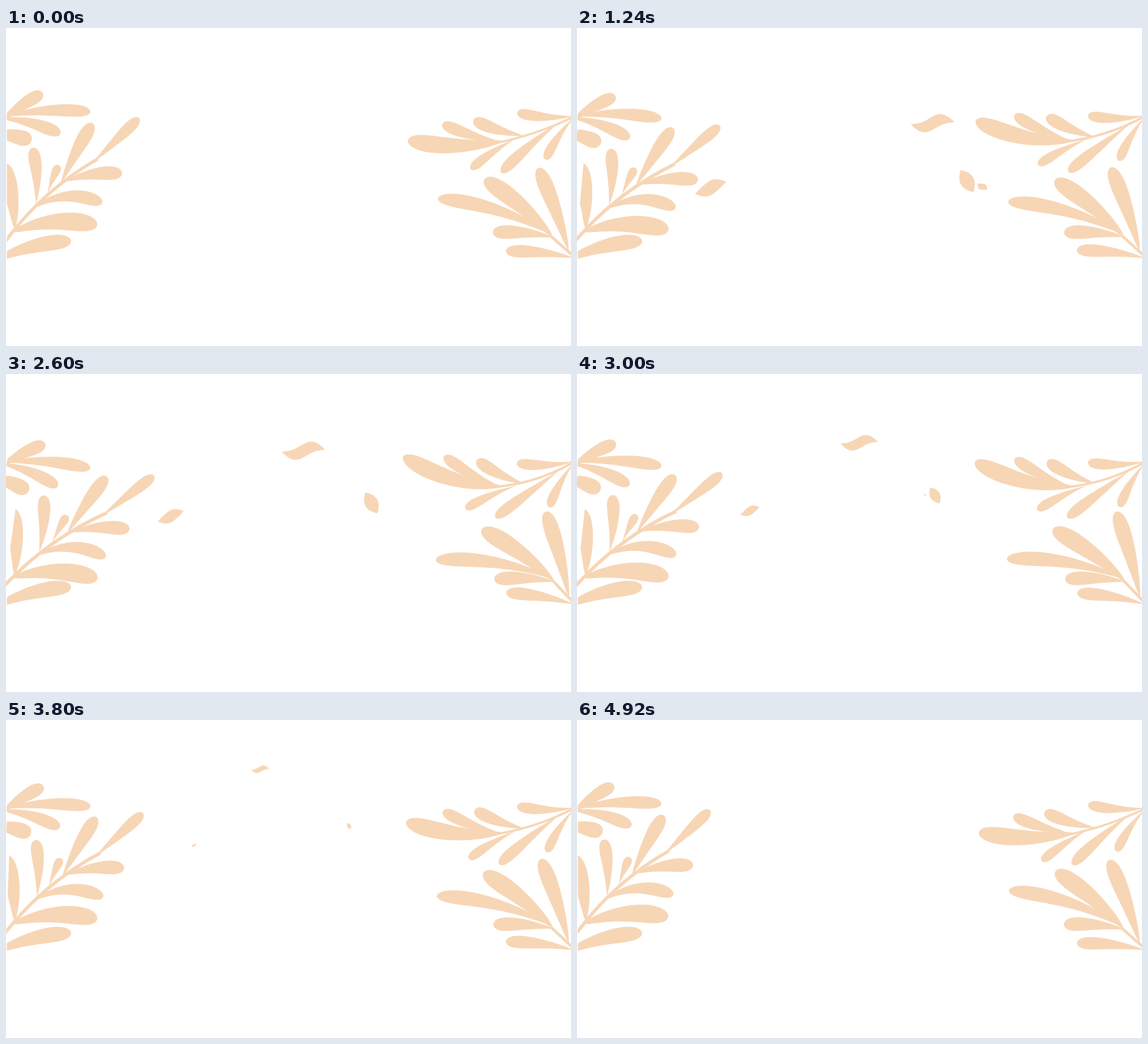
An HTML page with a canvas for the animation above (5040 ms loop, 998 by 561 pixels).

```html
<!DOCTYPE html>
<html lang="en">
<head>
<meta charset="utf-8">
<title>Swaying leaves</title>
<style>
html, body { margin: 0; width: 100%; height: 100%; overflow: hidden; background: #fff; }
canvas { display: block; }
</style>
</head>
<body>
<canvas id="stage" width="998" height="561"></canvas>
<script>
const ctx = document.getElementById('stage').getContext('2d');
const WIDTH = 998, HEIGHT = 561, LOOP = 5040, STEP = 40, COLOR = '#f7d6b6', CUT = 1.5;

const clamp = v => Math.max(0, Math.min(1, v));

// 0 -> 1 -> 0 with sine easing on both halves.
const sway = (start, peak, end) => t => {
  const k = t < peak ? (t - start) / (peak - start) : (end - t) / (end - peak);
  return (1 - Math.cos(Math.PI * clamp(k))) / 2;
};

function rotate([x, y], [cx, cy], angle) {
  const c = Math.cos(angle), n = Math.sin(angle);
  return [cx + (x - cx) * c - (y - cy) * n, cy + (x - cx) * n + (y - cy) * c];
}

// Bends move a point; s is the amount of sway.
const still = p => p;
const turn = (cx, cy, angle) => (p, s) => rotate(p, [cx, cy], angle * s);
const lean = ([x, y], s) => [x + 0.147 * (352 - y) * s, y + 0.098 * (x - 12) * s];

// Turns around the middle of the branch, fades to the fixed root, curls at the far end.
function curl([x, y], s) {
  const d = x - 885;
  const angle = 0.19 * s * (1 - Math.max(0, d) / 113);
  const far = s * Math.max(0, 820 - x) ** 2;
  return [x - angle * (y - 195) - 0.0007 * far, y + angle * d - 0.002 * far];
}

// Start, control and end of a curve whose middle lies "bow" to the left of its chord.
function bowed(x0, y0, x1, y1, bow) {
  const dx = x1 - x0, dy = y1 - y0, k = 2 * bow / Math.hypot(dx, dy);
  return [[x0, y0], [(x0 + x1) / 2 + dy * k, (y0 + y1) / 2 - dx * k], [x1, y1]];
}

function fill(points) {
  ctx.beginPath();
  for (const [x, y] of points) ctx.lineTo(x, y);
  ctx.fill();
}

// Club shape along a curve: narrow leaves swell later than wide ones, all end round.
function drawLeaf([a, b, c], width) {
  const rise = 20 / width, n = 6, samples = 32;
  const profile = u => u ** rise * Math.sqrt(1 - u ** n);
  const half = width / 2 / profile((2 * rise / (2 * rise + n)) ** (1 / n));
  const left = [], right = [];
  for (let i = 0; i <= samples; i++) {
    const u = 1 - (1 - i / samples) ** 2, v = 1 - u;
    const [x, y] = [0, 1].map(j => v * v * a[j] + 2 * u * v * b[j] + u * u * c[j]);
    const [dx, dy] = [0, 1].map(j => v * (b[j] - a[j]) + u * (c[j] - b[j]));
    const k = half * profile(u) / Math.hypot(dx, dy);
    left.push([x + dy * k, y - dx * k]);
    right.unshift([x - dy * k, y + dx * k]);
  }
  fill([...left, ...right]);
}

function drawStem([a, b, c], width) {
  ctx.lineWidth = width;
  ctx.beginPath();
  ctx.moveTo(...a);
  ctx.quadraticCurveTo(...b, ...c);
  ctx.stroke();
}

const lowerLeft = sway(0, 2180, 4600), upperRight = sway(130, 2080, 4880), lowerRight = sway(610, 2690, 4560);

// Stem and leaf: root x, y, tip x, y, bow, width. A leaf with a seventh value
// swings by that angle around its root instead of following the whole bend.
const branches = [
  { wave: lowerLeft, bend: turn(2, 155, 0.135), cut: true, leaves: [
    [-12, 167, 65, 115, 3, 23], [-12, 158, 149, 148, 7, 22], [-14, 159, 96, 187, 6, 22]] },
  { wave: lowerLeft, bend: turn(2, 177, 0.22), cut: true, leaves: [[-30, 186, 45, 199, 3, 27]] },
  { wave: lowerLeft, bend: lean, cut: true, stem: [-3, 379, 162, 231, 12, 6], leaves: [
    [15, 354, -8, 238, -6, 30], [53, 310, 47, 211, -4, 22], [73, 293, 93, 242, 1, 15],
    [97, 274, 153, 168, 2, 24], [152, 239, 235, 159, 0, 20], [103, 271, 205, 257, 6, 24],
    [46, 319, 170, 309, 17, 23], [11, 360, 161, 348, 12, 32]] },
  { wave: lowerLeft, bend: still, cut: true, leaves: [[-30, 416, 115, 376, 9, 27]] },
  { wave: upperRight, bend: curl, stem: [1004, 156, 860, 204, 5, 4], leaves: [
    [880, 199, 710, 198, 9, 30], [872, 200, 771, 169, 4, 21], [915, 190, 826, 162, 4, 22],
    [902, 194, 821, 249, -3, 17], [975, 168, 875, 255, -3, 20],
    [1004, 155, 903, 149, 5, 19, -0.1], [1004, 157, 953, 232, -4, 17, -0.1]] },
  { wave: lowerRight, bend: turn(998, 400, 0.09), stem: [1004, 404, 962, 367, 0, 5], leaves: [
    [994, 394, 940, 247, -3, 27, 0.085], [966, 369, 845, 267, -6, 31, -0.08],
    [962, 364, 763, 301, -12, 25, -0.15], [966, 369, 860, 361, -4, 24, -0.04],
    [1004, 406, 883, 394, -4, 22, 0.071]] }
];

function drawBranch({ wave, bend, cut, stem, leaves }, t) {
  const s = wave(t);
  ctx.save();
  if (cut) {
    ctx.beginPath();
    for (const p of [bend([CUT, 0], s), [WIDTH, 0], [WIDTH, HEIGHT], bend([CUT, HEIGHT], s)]) ctx.lineTo(...p);
    ctx.clip();
  }
  if (stem) drawStem(bowed(...stem).map(p => bend(p, s)), stem[5]);
  for (const [x, y, tipX, tipY, bow, width, swing] of leaves) {
    const [rx, ry] = bend([x, y], s);
    const pose = swing === undefined
      ? p => bend(p, s)
      : p => rotate([p[0] + rx - x, p[1] + ry - y], [rx, ry], swing * s);
    drawLeaf(bowed(x, y, tipX, tipY, bow).map(pose), width);
  }
  ctx.restore();
}

// Petals drift along a curve through three evenly timed points.
const DRIFT_START = 1240, DRIFT_TIME = 2560;
const petals = [
  { path: [[236, 282], [288, 253], [332, 221]], size: [59, 23], wave: 2, angle: -0.38, gone: 4100 },
  { path: [[628, 168], [531, 138], [449, 87]], size: [77, 23], wave: 6, angle: -0.05, gone: 4550 },
  { path: [[689, 270], [648, 230], [606, 187]], size: [45, 25], wave: 0, angle: 1.05, gone: 4300 },
  { path: [[716, 280], [636, 234], [589, 174]], size: [20, 12], wave: 1, angle: 0.55, gone: 4300, flutter: 2200 }
];

function drawPetal({ path: [a, b, c], size: [length, width], wave, angle, gone, flutter }, t) {
  const k = (t - DRIFT_START) / DRIFT_TIME;
  let scale = Math.min(clamp((t - 240) / 1000), clamp((gone - t) / 1800));
  if (flutter) scale *= Math.max(0, Math.cos(2 * Math.PI * (t - DRIFT_START) / flutter));
  if (scale < 0.01) return;
  const [x, y] = [0, 1].map(j =>
    a[j] * (1 - k) * (1 - 2 * k) + b[j] * 4 * k * (1 - k) + c[j] * k * (2 * k - 1));
  const points = [], samples = 48;
  for (let i = 0; i < samples; i++) {
    const phase = 2 * Math.PI * i / samples, u = -Math.cos(phase) / 2;
    const edge = Math.sin(phase) * Math.abs(Math.sin(phase)) * width / 2;
    points.push(rotate([u * length, -wave * Math.sin(2 * Math.PI * u) - edge], [0, 0], angle));
  }
  fill(points.map(([px, py]) => [x + px * scale, y + py * scale]));
}

function draw(t) {
  ctx.fillStyle = '#fff';
  ctx.fillRect(0, 0, WIDTH, HEIGHT);
  ctx.fillStyle = ctx.strokeStyle = COLOR;
  for (const branch of branches) drawBranch(branch, t);
  for (const petal of petals) drawPetal(petal, t);
}

const begin = performance.now();
function tick() {
  const t = (performance.now() - begin) % LOOP;
  draw(Math.floor(t / STEP) * STEP);
  requestAnimationFrame(tick);
}
tick();
</script>
</body>
</html>
```
